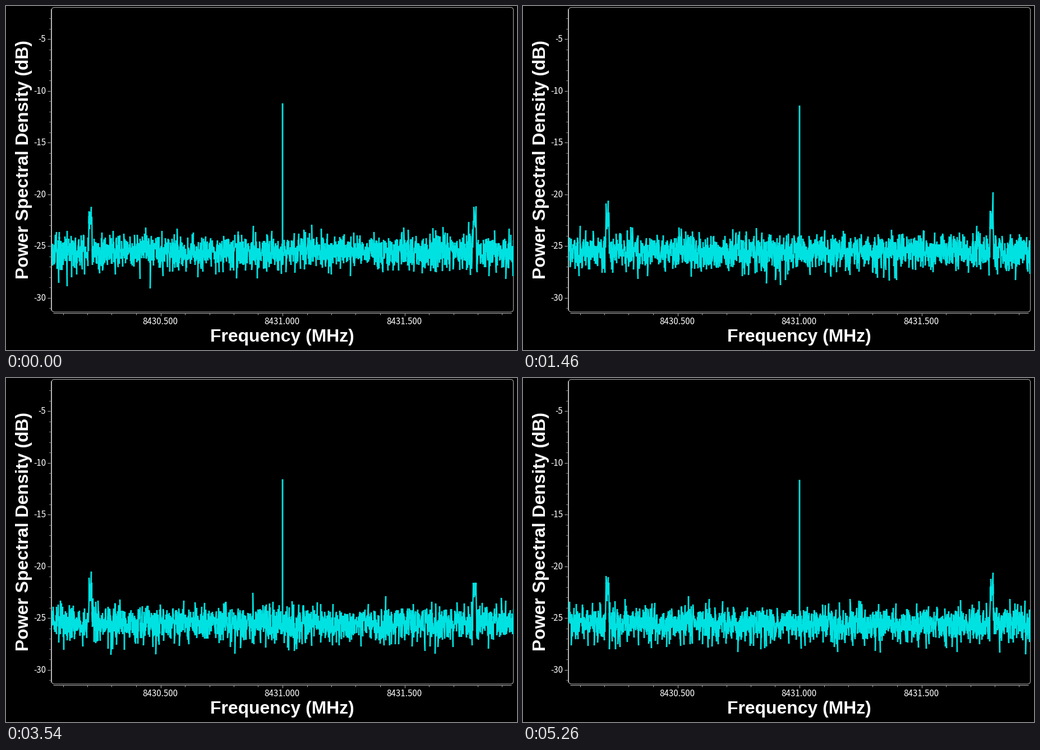
These frames come from a looping animation (911x615 px, 5340 ms). A matplotlib script:

```python
import matplotlib.pyplot as plt
import numpy as np
from matplotlib.animation import FuncAnimation
from matplotlib.patches import FancyBboxPatch, Rectangle

W, H, DPI = 911, 615, 100
LOOP, STEP = 5340, 20
PX = 72 / DPI                      # points per pixel
CYAN, GREY = "#00e2e2", "#b4b4b4"
LEFT, TOP, RIGHT, BOTTOM = 81.5, 2.5, 904.5, 547

MHZ = 435                          # pixels per MHz
DB = 18.5                          # pixels per dB
CENTER = 493
BIN = MHZ / 1024
HALF = 973
FLOOR = -25.5                      # mean noise level in dB
SIDE = 342.5                       # distance of the sidebands from the carrier

plt.rcParams["path.simplify"] = False


def freq_x(mhz):
    return 492.5 + (mhz - 8431) * MHZ


def db_y(db):
    return 58.5 - (db + 5) * DB


# Sweeps arrive at a steady rate on a 128-tick clock; the 24th is one tick late
n = np.arange(38)
ticks = np.floor(3.45 * n - 2.18 + 1.05 * (n > 23))
arrivals = np.maximum(0, ticks * LOOP / 128 - 14)
arrivals[0] = 0

bins = CENTER + np.arange(-HALF, HALF + 1) * BIN
cols = np.floor(bins + 0.5)
sideband = np.abs(np.abs(bins - CENTER) - SIDE) < 3


def carrier(t):
    return np.interp(t, [0, 800, 2000, 2700, 3500, LOOP],
                     [-11.25, -11.63, -11.3, -11.15, -11.62, -11.67])


def spectrum(k):
    """Pixel rows of sweep k: averaged noise, two sidebands and the carrier."""
    rng = np.random.default_rng(700 + k)
    noise = 10 * np.log10(rng.gamma(24, 1 / 24, bins.size))
    db = FLOOR + noise
    db[sideband] = np.clip(noise[sideband] - 22.3, -23.4, -21.6)
    for x in (-SIDE - 2, -SIDE + 1.5, SIDE - 1.5, SIDE + 2):
        db[HALF + round(x / BIN)] = rng.normal(-20.9, 0.6)
    db[HALF] = carrier(arrivals[k])
    return np.round(db_y(db))


sweeps = [spectrum(k) for k in n]

fig = plt.figure(figsize=(W / DPI, H / DPI), dpi=DPI, facecolor="black")
ax = fig.add_axes([0, 0, 1, 1])
ax.set(xlim=(0, W), ylim=(H, 0))
ax.axis("off")

hair = dict(colors=GREY, linewidths=PX)
ax.add_patch(FancyBboxPatch((LEFT, TOP), RIGHT - LEFT, BOTTOM - TOP,
                            boxstyle="round,pad=0,rounding_size=5",
                            fc="none", ec=GREY, lw=PX))
ax.vlines(79.5, 5, 544, **hair)
ax.hlines(548.5, 84, 901, **hair)

label = dict(color="white", family="Noto Sans CJK JP", weight="medium",
             size=15.1 * PX, va="baseline")
for db in range(-31, -2):
    y = np.floor(db_y(db)) + 0.5
    major = db % 5 == 0
    ax.hlines(y, 74 if major else 77, 79, **hair)
    if major:
        ax.text(71, y + 5.5, str(db), ha="right", **label)
for k in range(-9, 10):
    mhz = 8431 + k / 10
    x = np.floor(freq_x(mhz)) + 0.5
    major = k % 5 == 0
    ax.vlines(x, 549, 554 if major else 552, **hair)
    if major:
        ax.text(x - 1, 569, f"{mhz:.3f}", ha="center", **label)

title = dict(color="white", family="Liberation Sans", weight="bold",
             size=31.9 * PX, ha="center", va="baseline")
ax.text(492.5, 600, "Frequency (MHz)", **title)
ax.text(40, 274.5, "Power Spectral Density (dB)", rotation=90,
        rotation_mode="anchor", **title)

trace, = ax.plot(cols, sweeps[0], color=CYAN, lw=2.4 * PX, snap=False,
                 solid_joinstyle="bevel", solid_capstyle="butt", zorder=5)
trace.set_clip_path(Rectangle((81, 3), 824, 543, transform=ax.transData))


def update(i):
    k = np.searchsorted(arrivals, (i + 0.5) * STEP, side="right") - 1
    trace.set_ydata(sweeps[k])
    return trace,


anim = FuncAnimation(fig, update, frames=LOOP // STEP, interval=STEP,
                     repeat=True, repeat_delay=0)
plt.show()
```
